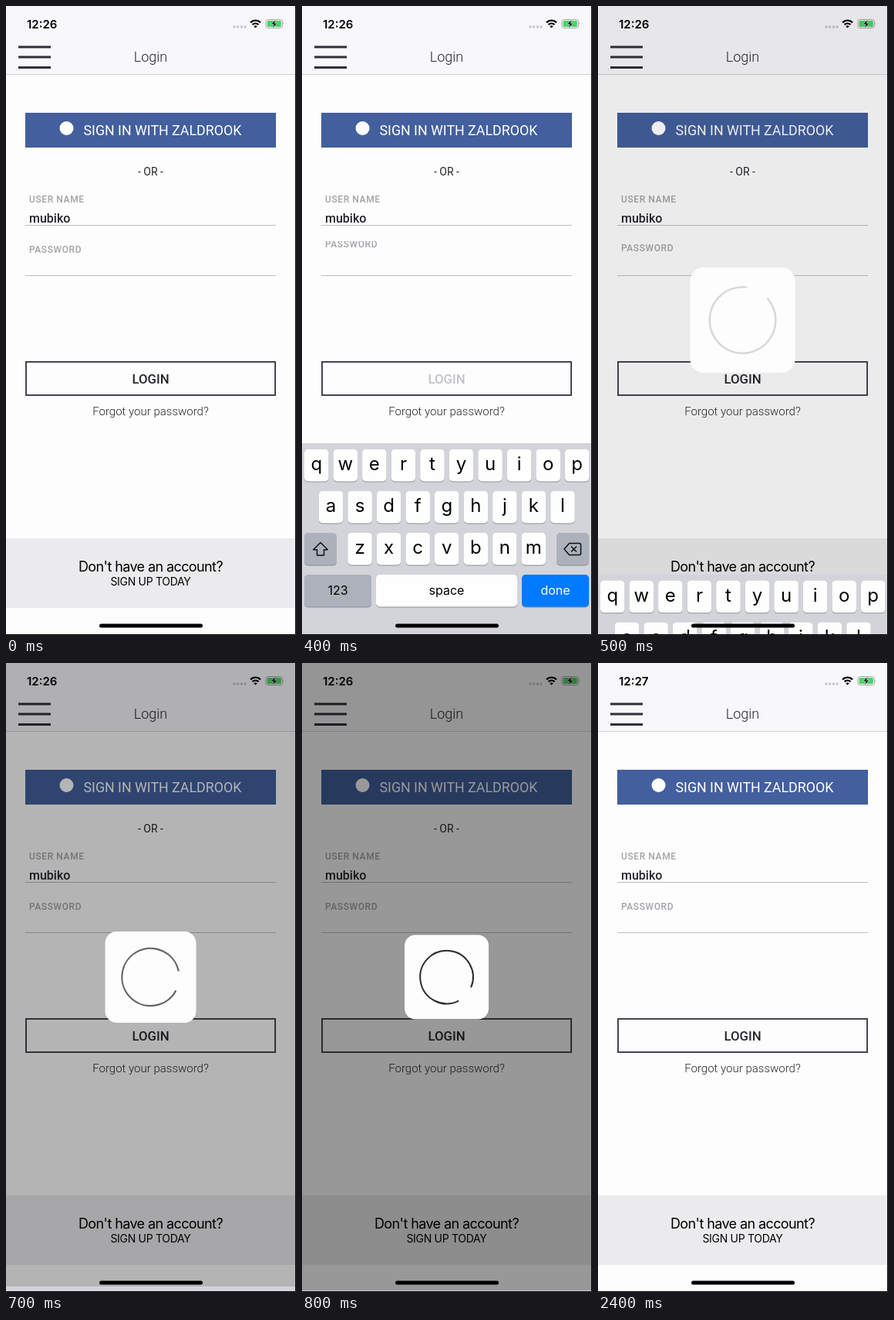
Recreate the animation shown at these times as an HTML page. Size 376 by 813 pixels, loop 3 s.

```html
<!DOCTYPE html>
<html lang="en">
<head>
<meta charset="utf-8">
<title>Login</title>
<style>
  html, body { margin: 0; width: 100%; height: 100%; overflow: hidden; background: #fefdfe; }
  svg { display: block; width: 100%; height: 100%; }
  text { font-family: Roboto, sans-serif; fill: #26252a; }
  .sys { font-family: Inter, sans-serif; fill: #000; }
  .mid { text-anchor: middle; }
  .label { font-size: 12px; font-weight: 500; letter-spacing: .6px; fill: #a3a2a7; }
</style>
</head>
<body>
<svg viewBox="0 0 376 813">
  <defs>
    <clipPath id="labelClip"><path d="M25 304h200v30h-200z"/></clipPath>
  </defs>
  <rect width="376" height="813" fill="#fefdfe"/>
  <rect width="376" height="88" fill="#f8f7fa"/>
  <path d="M0 88.5H376" stroke="#d3d2d6"/>

  <!-- status bar -->
  <text id="clock" class="sys" x="27" y="28.5" font-size="15" font-weight="600"></text>
  <g fill="#c6c5c9">
    <circle cx="296" cy="27" r="1.7"/><circle cx="300.7" cy="27" r="1.7"/>
    <circle cx="305.3" cy="27" r="1.7"/><circle cx="310" cy="27" r="1.7"/>
  </g>
  <g fill="none" stroke="#000" stroke-width="2.2">
    <path d="M317 21.4a9.2 9.2 0 0 1 13 0"/>
    <path d="M319.6 24.1a5.5 5.5 0 0 1 7.8 0"/>
    <path d="M323.5 28.6l-2.2-2.3a3.1 3.1 0 0 1 4.4 0z" fill="#000" stroke="none"/>
  </g>
  <rect x="336.9" y="17.5" width="21.5" height="11" rx="3" fill="none" stroke="#a5a4a8"/>
  <rect x="338.5" y="19" width="18.3" height="8" rx="1.6" fill="#4cd265"/>
  <path d="M359.7 21.2q1.4 1.8 0 3.6z" fill="#a5a4a8"/>
  <path d="M349.8 17.5l-6.3 6.2h3.6l-1.6 4.8 6.3-6.2h-3.6z" fill="#000" stroke="#dff5e3" stroke-width=".6"/>

  <!-- header and form -->
  <path d="M16 53H58M16 66H58M16 79.5H58" stroke="#332f38" stroke-width="2.8"/>
  <text class="mid" x="187.5" y="72" font-size="18" font-weight="300">Login</text>
  <rect x="25" y="138" width="325" height="45" fill="#435f9d"/>
  <circle cx="78.5" cy="158" r="9" fill="#fff"/>
  <text x="100.5" y="167" font-size="17.8" style="fill:#fff">SIGN IN WITH ZALDROOK</text>
  <text id="or" class="mid" x="187.5" y="218.5" font-size="14">- OR -</text>
  <text class="label" x="30" y="253.5">USER NAME</text>
  <text x="30" y="280" font-size="16" font-weight="500">mubiko</text>
  <g clip-path="url(#labelClip)"><text id="pass" class="label" x="30" y="318.5">PASSWORD</text></g>
  <path d="M25 283.5H350M25 348.5H350" stroke="#bdbcc0"/>
  <rect x="26" y="460" width="323" height="43" fill="none" stroke="#47454d" stroke-width="2"/>
  <text id="login" class="mid" x="187.5" y="487.5" font-size="16.8" font-weight="500">LOGIN</text>
  <text class="mid" x="187.5" y="529" font-size="15" font-weight="300">Forgot your password?</text>
  <rect y="688" width="376" height="90" fill="#ebeaec"/>
  <text class="sys mid" x="187.5" y="731" font-size="18" letter-spacing="-.6">Don't have an account?</text>
  <text class="sys mid" x="187.5" y="748.5" font-size="14" letter-spacing="-.3">SIGN UP TODAY</text>

  <!-- progress overlay -->
  <g id="busy">
    <rect id="dim" width="376" height="813"/>
    <g id="hud">
      <rect x="-54.5" y="-54.5" width="109" height="109" rx="14" fill="#fdfdfe"/>
      <path id="ring" d="M26.3 22A34.3 34.3 0 1 1 34.3 0" fill="none" stroke="#2c2b30" stroke-width="2"/>
    </g>
  </g>

  <g id="keyboard"><rect y="565" width="376" height="260" fill="#d2d4da"/></g>
  <rect x="121" y="798.5" width="134" height="5" rx="2.5"/>
  <path d="M375.5 0V812.5H0" fill="none" stroke="#000"/>
</svg>
<script>
const $ = id => document.getElementById(id);
const keyboard = $('keyboard');

function add(tag, attrs, text = '') {
  const el = document.createElementNS('http://www.w3.org/2000/svg', tag);
  for (const name in attrs) el.setAttribute(name, attrs[name]);
  el.textContent = text;
  keyboard.append(el);
}

function key(x, y, width, label, size = 16, fill = '#fefefe', ink = '#000') {
  const box = { x, width, height: 41.5, rx: 4.8 };
  add('rect', { ...box, y: y + 1, fill: '#8c8f95' });
  add('rect', { ...box, y, fill });
  const base = y + (size > 20 ? 27 : 26);
  add('text', { class: 'sys mid', x: x + width / 2, y: base, 'font-size': size, style: `fill:${ink}` }, label);
}

const grey = '#adb1bb';
[['qwertyuiop', 3], ['asdfghjkl', 21.8], ['zxcvbnm', 59.3]].forEach(([row, left], r) =>
  [...row].forEach((c, i) => key(left + i * 37.55, 573 + r * 54, 31.5, c, 24)));
key(3, 681, 42, '', 16, grey);
key(330, 681, 42, '', 16, grey);
key(3, 735, 87, '123', 16, grey);
key(96, 735, 183, 'space');
key(285, 735, 87, 'done', 16, '#007aff', '#fff');
const icon = { fill: 'none', stroke: '#111', 'stroke-width': 1.5, 'stroke-linejoin': 'round' };
add('path', { ...icon, d: 'M24 693.5l9.3 9.3h-4.8v7.2h-9v-7.2h-4.8z' });
add('path', { ...icon, d: 'M340 702l6.5-7.5h13q2 0 2 2v11q0 2-2 2h-13zM349 698.5l7 7m0-7l-7 7' });

function draw(t) {
  const step = Math.floor(t / 100);
  const show = (id, on) => $(id).setAttribute('display', on ? 'inline' : 'none');
  $('clock').textContent = step < 24 ? '12:26' : '12:27';
  $('login').style.fill = step >= 2 && step < 5 ? '#c2c1c6' : '';
  $('pass').setAttribute('y', 318.5 - (step === 4 ? 7 : step === 5 ? 2 : 0));
  show('or', step < 9);

  // critically damped slide
  const x = 3.89 + 1.52 * (step - 6);
  const left = step === 4 ? 1 : (1 + x) * Math.exp(-x);
  show('keyboard', step >= 4 && step < 9);
  keyboard.setAttribute('transform', `translate(0 ${248 * (1 - left)})`);

  // overlay fades in while the panel shrinks to size
  const p = Math.min(1, .175 + .275 * (step - 5));
  show('busy', step >= 5 && step < 9);
  $('dim').setAttribute('opacity', .4 * p);
  $('hud').setAttribute('transform', `translate(187.5 406) scale(${1.3 - .3 * p})`);
  $('ring').setAttribute('opacity', p);
  $('ring').setAttribute('transform', `rotate(${-47 + 35 * (step - 6)})`);
}

const start = performance.now();
function tick() {
  draw((performance.now() - start) % 3000);
  requestAnimationFrame(tick);
}
tick();
</script>
</body>
</html>
```
